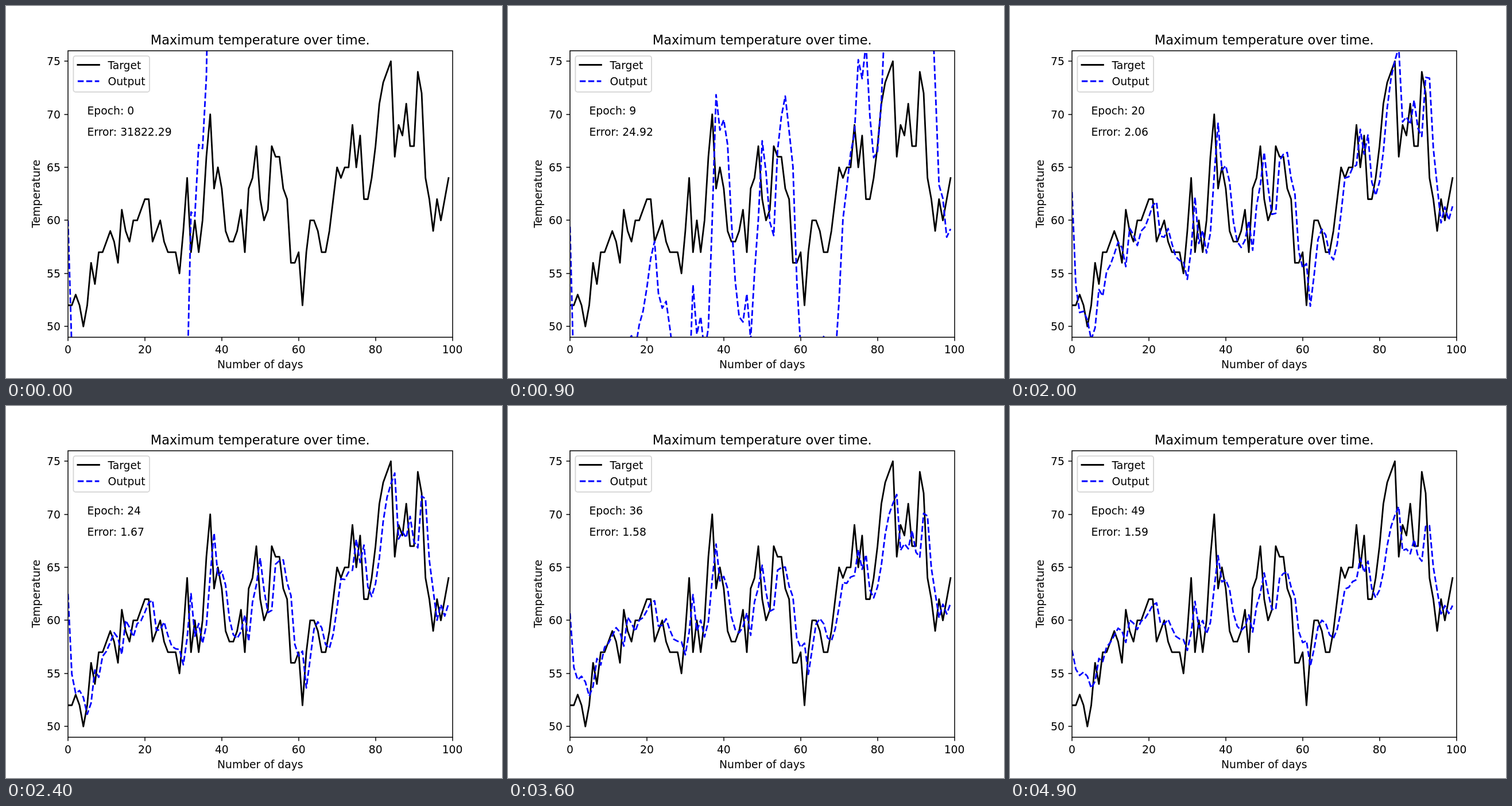
Animation, 864 px wide and 648 px high, one loop 5000 ms. Source, as an HTML page:

```html
<!DOCTYPE html>
<html lang="en">
<head>
<meta charset="utf-8">
<title>Maximum temperature over time</title>
<style>
html, body { margin: 0; width: 100%; height: 100%; overflow: hidden; background: #fff; }
svg { display: block; width: 864px; height: 648px; font: 18.75px "DejaVu Sans", sans-serif; }
.line { fill: none; stroke: #000; stroke-width: 2.8125; stroke-linejoin: round; stroke-linecap: square; }
.dash { stroke: #00f; stroke-linecap: butt; stroke-dasharray: 10.406 4.5; }
.axis { fill: none; stroke: #000; stroke-width: 1.5; }
.mid { text-anchor: middle; }
.end { text-anchor: end; }
</style>
</head>
<body>
<svg viewBox="0 0 864 648">
  <defs><clipPath id="plot"><rect x="108" y="77.76" width="669.6" height="498.96"/></clipPath></defs>
  <g clip-path="url(#plot)">
    <path id="target" class="line"/>
    <path id="output" class="line dash"/>
  </g>
  <rect class="axis" x="108" y="78" width="670" height="499"/>
  <g id="ticks"></g>
  <text class="mid" x="442.8" y="66.5" font-size="22.5">Maximum temperature over time.</text>
  <text class="mid" x="442.8" y="631">Number of days</text>
  <text class="mid" transform="translate(59 327.2) rotate(-90)">Temperature</text>
  <text id="epoch" x="141.5" y="188.5"></text>
  <text id="error" x="141.5" y="225.5"></text>
  <rect x="117.4" y="87.1" width="132.6" height="62.6" rx="3.75" fill="#fff" fill-opacity=".8" stroke="#ccc" stroke-opacity=".8" stroke-width="1.875"/>
  <path class="line" d="M124.9 102.5h37.5"/>
  <path class="line dash" d="M124.9 131h37.5"/>
  <text x="177.4" y="109.5">Target</text>
  <text x="177.4" y="137.5">Output</text>
</svg>
<script>
const temps = [
  52, 52, 53, 52, 50, 52, 56, 54, 57, 57, 58, 59, 58, 56, 61, 59, 58, 60, 60, 61,
  62, 62, 58, 59, 60, 58, 57, 57, 57, 55, 59, 64, 57, 60, 57, 60, 66, 70, 63, 65,
  63, 59, 58, 58, 59, 61, 57, 63, 64, 67, 62, 60, 61, 67, 66, 66, 63, 62, 56, 56,
  57, 52, 57, 60, 60, 59, 57, 57, 59, 62, 65, 64, 65, 65, 69, 65, 68, 62, 62, 64,
  67, 71, 73, 74, 75, 66, 69, 68, 71, 67, 67, 74, 72, 64, 62, 59, 62, 60, 62, 64];

// Learned state: epoch, first output, feedback weight, input weight, bias, error
const steps = [
  [0, 60, 1.005, 2.38, 11.5, 31822.29],
  [3, 59.7, .85, 2, 1.5, 600],
  [9, 59.4, .585, 1.46, .125, 24.92],
  [14, 61.6, .468, 1.12, .77, 7.08],
  [20, 62.67, .285, .825, 1.323, 2.06],
  [28, 62.02, .222, .648, 1.556, 1.61],
  [36, 60.67, .23, .605, 1.463, 1.58],
  [49, 57.2, .32, .49, 1.19, 1.59]];
for (const s of steps) s[5] = Math.log(s[5]);

const $ = id => document.getElementById(id);
const px = day => 108 + day * 6.696;
const py = temp => 576.72 - (temp - 49) * 18.48;

function slope(i, col) {
  const a = steps[Math.max(i - 1, 0)], b = steps[Math.min(i + 1, steps.length - 1)];
  return (b[col] - a[col]) / (b[0] - a[0]);
}

// Smooth curve through one column of the table
function at(epoch, col) {
  let i = 0;
  while (i < steps.length - 2 && steps[i + 1][0] <= epoch) i++;
  const a = steps[i], b = steps[i + 1], span = b[0] - a[0];
  const u = (epoch - a[0]) / span, v = 1 - u;
  return a[col] * v * v * (1 + 2 * u) + b[col] * u * u * (3 - 2 * u)
    + span * u * v * (v * slope(i, col) - u * slope(i + 1, col));
}

function predict(epoch) {
  const [first, back, gain, bias] = [1, 2, 3, 4].map(col => at(epoch, col));
  const out = [first];
  for (let d = 1; d < temps.length; d++)
    out.push(60 + bias + back * (out[d - 1] - 60) + gain * (temps[d - 1] - 62));
  return out;
}

// Polyline cut at the stage edges, so dashes restart on re-entry
function trace(values) {
  const top = -1, bottom = 649;
  let d = "", open = false;
  for (let i = 1; i < values.length; i++) {
    const y0 = py(values[i - 1]), dy = py(values[i]) - y0;
    let from = 0, to = 1;
    if (dy) {
      const a = (top - y0) / dy, b = (bottom - y0) / dy;
      from = Math.max(0, Math.min(a, b));
      to = Math.min(1, Math.max(a, b));
    } else if (y0 < top || y0 > bottom) to = -1;
    if (from >= to) { open = false; continue; }
    const point = u => px(i - 1 + u).toFixed(2) + " " + (y0 + dy * u).toFixed(2);
    if (!open || from > 0) d += "M" + point(from);
    d += "L" + point(to);
    open = to === 1;
  }
  return d;
}

let ticks = "";
for (let day = 0; day <= 100; day += 20) {
  const x = Math.round(px(day));
  ticks += `<path class="axis" d="M${x} 577v6.5"/><text class="mid" x="${px(day)}" y="604.7">${day}</text>`;
}
for (let temp = 50; temp <= 75; temp += 5) {
  const y = Math.round(py(temp));
  ticks += `<path class="axis" d="M108 ${y}h-6.5"/><text class="end" x="94.9" y="${y + 7}">${temp}</text>`;
}
$("ticks").innerHTML = ticks;
$("target").setAttribute("d", trace(temps));

let shown = -1;
function draw(epoch) {
  if (epoch === shown) return;
  shown = epoch;
  $("output").setAttribute("d", trace(predict(epoch)));
  $("epoch").textContent = "Epoch: " + epoch;
  $("error").textContent = "Error: " + Math.exp(at(epoch, 5)).toFixed(2);
}

const start = performance.now();
function tick() {
  draw(Math.floor((performance.now() - start) % 5000 / 100));
  requestAnimationFrame(tick);
}
tick();
</script>
</body>
</html>
```
